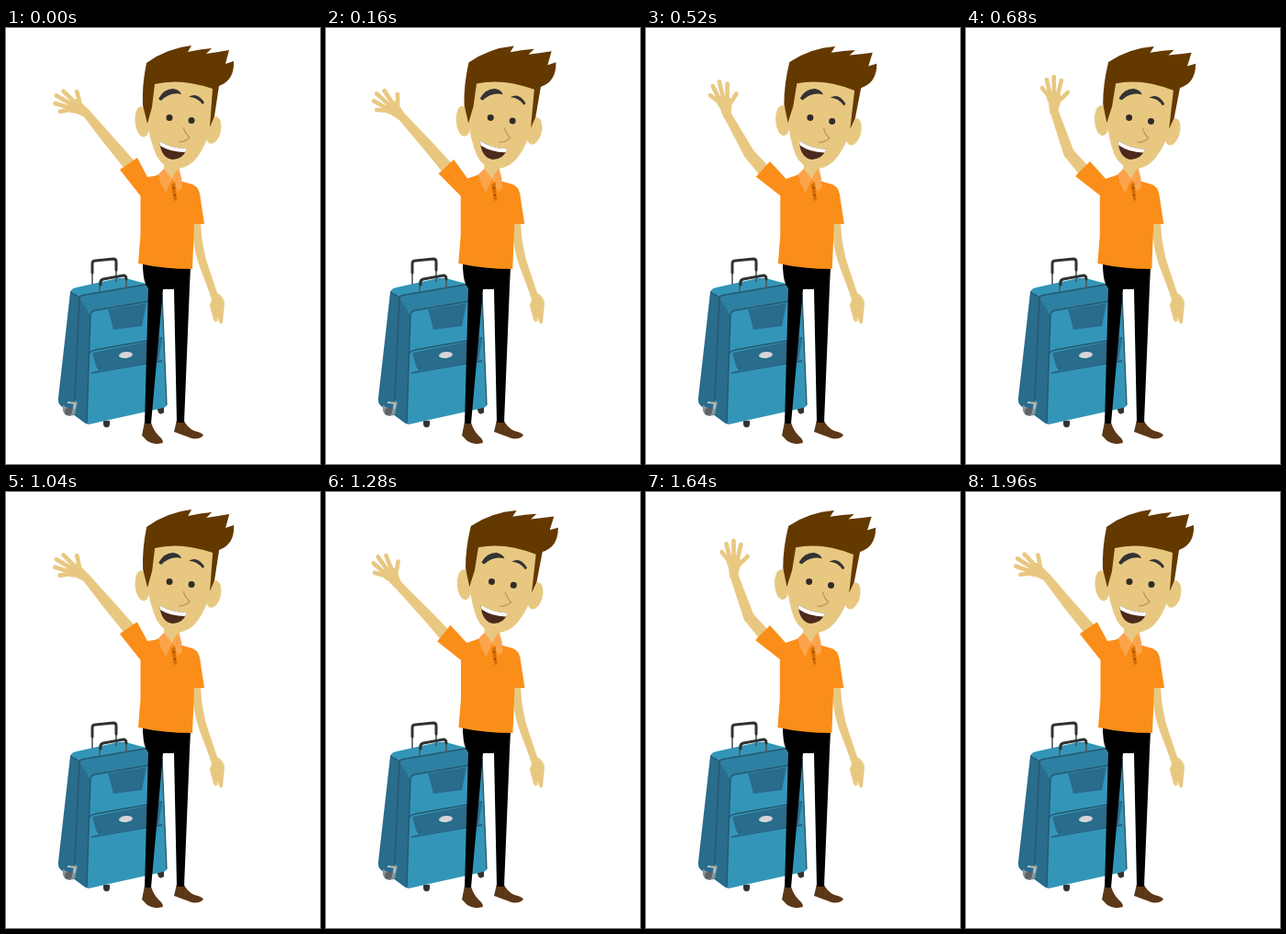
Write an HTML page that moves like this. It is 342 px wide and 474 px high and loops after 2 s.

```html
<!DOCTYPE html>
<html lang="en">
<head>
<meta charset="utf-8">
<title>Waving traveller</title>
<style>
  html, body { margin: 0; width: 100%; height: 100%; overflow: hidden; background: #fff; }
  svg { display: block; width: 100vw; height: 100vh; }
  .skin { fill: #e8c881; }
  .shirt { fill: #fa8e19; }
  .collar { fill: #fba44d; }
  .hair { fill: #643900; }
  .shoe { fill: #5b3817; }
  .front { fill: #3396b9; }
  .lid { fill: #2d80a3; }
  .shade { fill: #296c8b; }
  .seam { fill: none; stroke: #28566b; stroke-width: 1.3; stroke-linejoin: round; }
  .rod { fill: none; stroke: #55585b; stroke-width: 1.6; }
  .grip { fill: none; stroke: #303234; stroke-width: 3; stroke-linejoin: round; stroke-linecap: round; }
  .finger { fill: none; stroke: #e8c881; stroke-width: 4.6; stroke-linecap: round; }
</style>
</head>
<body>
<svg viewBox="0 0 342 474">
  <g id="suitcase">
    <path fill="#303234" d="M106 427h7v4q-1 4-4 3-3 0-3-4zM164 412h8v6q-4 3-6 0z"/>
    <path class="front" d="M70 287Q71 283 77 282L122 272Q128 271 134 273L164 281Q169 283 170 289L175 408Q176 412 171 413L90 431Q87 431 84 428L73 419z"/>
    <path class="shade" d="M70 287Q73 289 80 292L92 311 88 430 84 428 73 420 60 411Q56 408 57 402z"/>
    <path class="lid" d="M80 293Q82 290 87 290L157 278V297L97 307Q92 308 92 313z"/>
    <path class="seam" d="M70 287Q76 290 80 293L74 420M80 293Q82 290 87 290L157 278M88 430 92 313Q92 308 97 307L156 297M93 375 170 362M170 290 175 410"/>
    <path class="shade" d="M111 306 153 299 148 324 117 328z"/>
    <path class="shade" d="M94 353 170 338 166 363 104 374Q100 373 98 367z"/>
    <path class="seam" d="M91 354Q92 351 97 350L170 337"/>
    <ellipse cx="130.500" cy="355.500" rx="7.500" ry="3.500" fill="#d3d6d8" transform="rotate(-7 130.500 355.500)"/>
    <path class="rod" d="M94 279V262M120 276V260"/>
    <path class="grip" d="M94 266V256Q94 253 97 253L117 251Q120 251 120 254V263"/>
    <path class="rod" d="M102 287V277M131 283V272"/>
    <path class="grip" d="M103 279Q102 274 106 273L128 269Q131 269 131 273"/>
    <path fill="#8b9398" d="M62 410 72 416 75 405 78 407 75 420Q69 424 64 420 61 416 62 410z"/>
    <path fill="none" stroke="#b9c0c4" stroke-width="2" d="M67 407 75 408 74 414"/>
    <circle cx="68" cy="417" r="4" fill="#5d6468"/>
  </g>

  <path class="skin" d="M203 210 212 211Q213 240 222 264L230 288Q237 292 238 299L236 321Q233 323 231 317L230 313V319Q226 321 225 313L222 302 224 295 222 289 209 254Q203 235 203 210z"/>
  <path class="shoe" d="M151 428 158 429Q161 438 166 443 171 447 171 451 161 454 154 449L148 443zM186 426 194 427Q197 434 205 438 214 440 215 443 210 448 202 446L183 439z"/>
  <path d="M149 256 201 260 200 281 194 429H186L183 284H171L158 430H151L155 283Q149 277 149 256z"/>

  <path id="arm" class="skin"/>
  <g id="hand">
    <path class="skin" d="M-4.500 3 -6-9Q-9-14-8-18L-3-21 5-20 9-14Q6-8 4 3z"/>
    <path class="finger" d="M-5-15-13-25M-4-17-8-34M0-18V-37M4-17 8-33M4-10 10-15 15-20"/>
  </g>

  <path id="sleeve" class="shirt"/>
  <g id="torso">
    <path class="shirt" d="M153 164 170 158 189 166 203 170Q209 172 211 180L216 213 205 213 203 262Q172 262 144 256L146.500 225V180z"/>
    <path class="skin" d="M172 145H189V156L181 165 172 158z"/>
    <path class="collar" d="M172 153 181 164 174 179Q167 168 166 159zM184 157 188 153Q192 162 192 174L187 178 181 164z"/>
    <path fill="#d76d08" d="M180 171 184 167 186 187 183 188z"/>
    <path fill="#7c3c00" d="M182 173h1.600v1.600h-1.600zM183 181h1.600v1.600h-1.600z"/>
  </g>

  <g id="head">
    <ellipse class="skin" cx="148.500" cy="102" rx="8" ry="16.500" transform="rotate(-6 148 102)"/>
    <ellipse class="skin" cx="226" cy="111" rx="8" ry="15" transform="rotate(12 226 111)"/>
    <path class="skin" d="M156 56 228 61 224 105Q219 125 210 138 200 153 184 153 171 152 164 139 156 122 153 95z"/>
    <path class="hair" d="M153 38Q175 22 202 19L198 26Q212 23 224 22L218 28Q232 26 243 24L239 39 248 36Q249 57 232 63L227 96 222 108 225 66Q190 54 162 61L159 86 154 104 149 84Q148 62 153 38z"/>
    <path fill="#333" d="M166 77Q172 66 182 66 189 67 191 72 179 69 169 79zM199 75Q208 69 216 81L214 83Q208 75 199 75z"/>
    <circle cx="178" cy="97.500" r="3.500" fill="#302c29"/>
    <circle cx="202" cy="100.500" r="3.500" fill="#302c29"/>
    <path fill="none" stroke="#bd9858" stroke-width="1.200" d="M193 108Q196 116 200 119 195 124 188 124"/>
    <path fill="#4b2a1d" d="M167 123Q180 131 197 131L196 133Q193 142 182 143 169 142 167 123z"/>
    <path fill="#fff" d="M167 123Q180 131 197 131L195 135Q179 135 168 128z"/>
  </g>
</svg>
<script>
const PERIOD = 1000;
const part = id => document.getElementById(id);
const arm = part("arm"), hand = part("hand"), sleeve = part("sleeve");
const torso = part("torso"), head = part("head");
const ease = u => (1 - Math.cos(Math.PI * u)) / 2;

// The wave cycles through three poses: stretched, bent, upright.
function poseMixer(time) {
  const phase = 3 * (time % PERIOD) / PERIOD;
  const from = Math.floor(phase), amount = ease(phase - from);
  return (...poses) => poses[from] + (poses[(from + 1) % 3] - poses[from]) * amount;
}

// Point beside the joint, across the given direction.
function beside([x, y], angle, offset) {
  return [x - Math.sin(angle) * offset, y + Math.cos(angle) * offset];
}
const heading = (a, b) => Math.atan2(b[1] - a[1], b[0] - a[0]);

function render(time) {
  const mix = poseMixer(time);
  const point = (a, b, c) => [0, 1].map(i => mix(a[i], b[i], c[i]));
  const lower = point([124, 154], [121, 163], [119, 161]);
  const upper = point([143, 141], [135, 145], [135, 145]);
  const elbow = point([111, 121], [113, 138], [112, 136]);
  const wrist = point([87, 92], [77.5, 101], [96, 90]);
  const seam = point([154, 162], [154, 165], [153, 165]);
  const root = [(lower[0] + upper[0]) / 2 + 5, (lower[1] + upper[1]) / 2 + 6];

  const first = heading(root, elbow), second = heading(elbow, wrist);
  const joints = [[root, first, 7], [elbow, (first + second) / 2, 6], [wrist, second, 4.5]];
  const near = joints.map(([at, angle, w]) => beside(at, angle, w));
  const far = joints.map(([at, angle, w]) => beside(at, angle, -w)).reverse();
  arm.setAttribute("d", "M" + near.concat(far).join("L") + "z");

  hand.setAttribute("transform", `translate(${wrist}) rotate(${mix(-60, -34, 0)})`);
  sleeve.setAttribute("d", `M${lower}L${upper}L${seam}L170 160L165 200L146 182z`);
  torso.setAttribute("transform", `translate(${mix(0, 0.5, -0.7)})`);
  head.setAttribute("transform",
    `translate(${mix(0, 0, -3)}) rotate(${mix(0, 2.4, 2.4)} 182 160)`);
}

const begin = performance.now();
function tick() {
  render(performance.now() - begin);
  requestAnimationFrame(tick);
}
tick();
</script>
</body>
</html>
```
